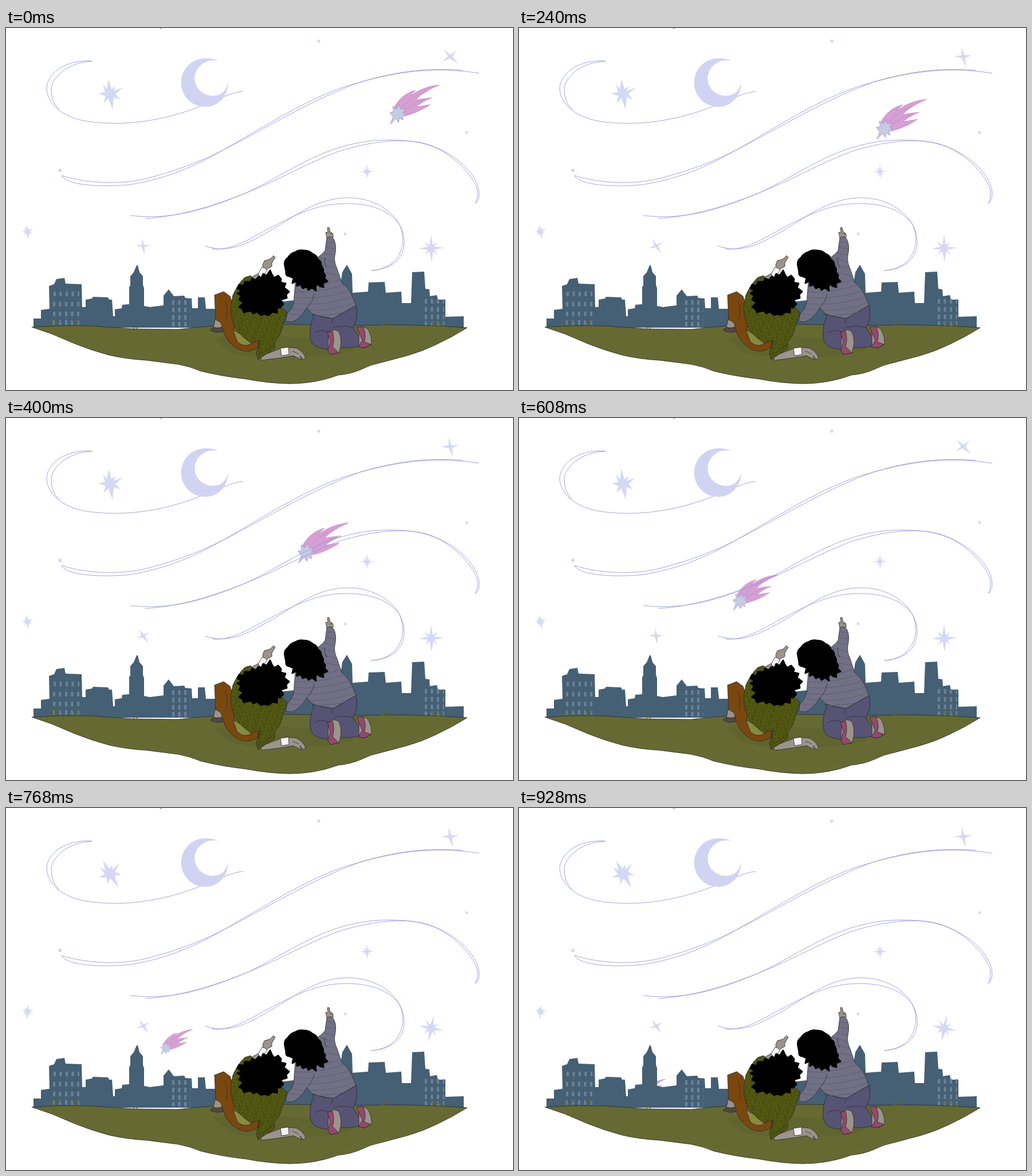
An HTML page without scripts that plays this animation: 885x633 px, repeating every 0.96 s.

```html
<!DOCTYPE html>
<html lang="en">
<head>
<meta charset="utf-8">
<title>Stargazers</title>
<style>
  html, body { margin: 0; width: 100%; height: 100%; overflow: hidden; background: #fff; }
  svg { display: block; width: 100%; height: 100%; }

  .sky { fill: #d5d7f5; }
  .wind { fill: none; stroke: #989be0; stroke-width: .9; }
  .city { fill: #455f75; }
  .windows { fill: none; stroke: #6a8295; stroke-width: 8; stroke-dasharray: 4 6.5; }
  .ink { stroke: #29282a; stroke-width: .8; stroke-linejoin: round; }
  .line { fill: none; stroke: #29282a; stroke-width: .7; }
  .grass { fill: none; stroke: #5c6129; stroke-width: 1.4; }
  .skin { fill: #9c938a; }
  .cuff { fill: #f4f3f6; }
  .hair { fill: #000; stroke: #000; stroke-width: 3; stroke-linejoin: round; }
  .ribs { fill: none; stroke: #5f5d7c; stroke-width: 1.1; }

  .comet, .swing, .sway { animation: 960ms step-end infinite; }
  .comet { animation-name: fall; }
  .swing { animation-name: swing; }
  .sway { animation-name: sway; }

  @keyframes fall {
    0% { transform: translate(684px, 149px); }
    16.667% { transform: translate(673px, 157px); }
    25% { transform: translate(638px, 175px) scale(1.02); }
    33.333% { transform: translate(586px, 202px) scale(1.04); }
    41.667% { transform: translate(524px, 234px) scale(1.03); }
    50% { transform: translate(453px, 272px); }
    58.333% { transform: translate(386px, 319px) scale(.91); }
    66.667% { transform: translate(331px, 366px) scale(.79); }
    75% { transform: translate(279px, 419px) scale(.65); }
    83.333% { transform: translate(247px, 461px) scale(.57); }
    91.667% { transform: translate(221px, 498px) scale(.49); }
  }
  @keyframes swing {
    0%, 50% { transform: rotate(var(--from)); }
    25%, 75% { transform: rotate(var(--to)); }
  }
  @keyframes sway {
    0% { transform: none; }
    75% { transform: rotate(var(--to)); }
  }
</style>
</head>
<body>
<svg viewBox="0 0 885 633" preserveAspectRatio="none">
  <defs>
    <path id="cross" d="M-1-14 2-2 13-1 3 2 3 15-2 2-13-1-2-2Z"/>
    <path id="burst" d="M-2-26 3-8 10-13 7-5 23-11 10 0 18 10 7 6 5 28-2 8-11 16-7 4-20-1-8-3-12-17-5-8Z"/>
    <path id="thin-burst" d="M0-26 3-6 12-12 6-3 25-1 6 3 13 13 4 6 1 26-3 6-12 13-6 3-24 1-6-3-14-13-3-6Z"/>
    <pattern id="spots" width="15" height="13" patternUnits="userSpaceOnUse" patternTransform="rotate(18)">
      <rect width="15" height="13" fill="#535912"/>
      <path d="M2 4q0-3 3-2M7 3q2 2 0 4M9 10q1-3 4-2M13 11q-2 2-4 1M2 9l2 2M12 3l1 2" fill="none" stroke="#3d420a" stroke-width="1.3" stroke-linecap="round"/>
    </pattern>
    <path id="sweater" d="M540 404Q552 396 557 389L560 367Q567 362 572 369Q578 380 574 398Q572 408 578 421L586 445Q598 454 604 468L611 485Q590 497 571 508Q550 505 535 500L525 489Q514 509 499 514L488 513L491 499Q504 488 503 468L505 446Q520 433 535 425Z"/>
    <clipPath id="knit"><use href="#sweater"/></clipPath>
  </defs>

  <rect width="885" height="633" fill="#fff"/>
  <path d="M268 0h5l-3 2Z" fill="#aaa"/>

  <g class="comet">
    <path d="M-6-11C2-25 14-36 31-40Q25-35 20-29C36-41 54-48 72-49C54-42 40-33 31-23Q46-26 59-27C48-23 39-17 32-11Q45-13 56-15C43-6 26 2 10 5Z" fill="#d5a0d3" stroke="#c982c5" stroke-width=".8"/>
    <path d="M8-11Q24-30 52-39M12-5Q26-18 48-23" fill="none" stroke="#c988c7" stroke-width=".9"/>
    <path d="M-13 19-8 6-14-1-7-3-9-12-2-7 2-15 5-7 13-9 9-1 15 4 8 5 9 12 3 8 1 16-3 9Z" fill="#c4cce4" stroke="#b18acb" stroke-width=".9"/>
  </g>

  <g class="wind">
    <path d="M151 58C101 54 71 82 71 106C72 132 98 156 140 163C200 172 262 164 320 144C360 130 392 112 414 111"/>
    <path d="M151 58C105 60 79 88 79 108Q79 129 92 142"/>
    <path d="M97 258C142 272 200 275 250 262Q322 243 378 214C460 167 536 117 610 97C684 76 746 67 826 79"/>
    <path d="M97 258C105 275 165 279 215 274C284 263 330 241 378 214C456 174 536 124 620 94Q712 66 798 74"/>
    <path d="M217 328C294 336 350 317 420 288C480 264 524 237 580 216C646 195 700 193 735 203C792 222 827 262 826 292Q825 303 819 307"/>
    <path d="M243 333C300 330 360 312 420 288C496 252 548 207 640 197Q718 191 760 214C800 238 820 269 823 285Q824 298 819 307"/>
    <path d="M347 381C378 393 410 383 440 366C490 341 532 300 590 297C650 294 695 332 695 374C695 406 670 422 638 424"/>
    <path d="M360 383L362 387C400 388 430 365 470 345C520 319 550 308 590 307C638 306 669 320 686 342C703 377 687 421 638 424"/>
  </g>

  <g class="sky">
    <path d="M371 57Q360 53 348 53A42.5 42.5 0 0 0 348 138A40 43 0 0 0 388 95Q384 112 371 117C347 124 325 105 330 81C336 62 352 54 371 57Z" fill="#d1d3f2"/>
    <g transform="translate(775 50) scale(1.22)"><use class="swing" href="#cross" style="--from:-37deg;--to:-4deg"/></g>
    <g transform="translate(239 381)"><use class="swing" href="#cross" style="--from:0deg;--to:-25deg"/></g>
    <g transform="translate(181 115)"><use class="sway" href="#burst" style="--to:-22deg"/></g>
    <g transform="translate(742 385) scale(.92)"><use class="sway" href="#thin-burst" style="--to:13deg"/></g>
    <g transform="translate(37 356) scale(.48)"><use class="sway" href="#burst" style="--to:14deg"/></g>
    <use href="#thin-burst" transform="translate(630 251) scale(.52)"/>
    <circle cx="546" cy="23" r="2.7"/>
    <circle cx="804" cy="183" r="2.4"/>
    <circle cx="94" cy="249" r="3"/>
    <circle cx="592" cy="360" r="2.5"/>
  </g>

  <g class="city">
    <path d="M48 524V508H49V508L61 508V493L76 491 75 451 84 448 88 439 102 437 104 447 132 448 133 488H139V475L150 473 152 470 178 471 180 475 185 475 187 504H190V492L202 490 203 484 215 483V453L217 450V434L223 427 228 415H230L233 427 239 434V449L241 455V486L251 488 275 485V468L284 457 293 469 311 468 313 472 324 473 325 490H335V471H347L349 491H370V524Z"/>
    <path d="M476 524V479L512 475 585 470V440L587 427 595 414 604 430 605 463 632 461 633 445 661 444 663 463 690 461 691 481H707L709 427 730 426 732 456 739 457 740 469 752 467 754 475H767V505L799 504V524Z"/>
  </g>
  <g class="windows">
    <path d="M83 465h45M82 483h47M82 500h47M82 515h47M290 480h32M290 493h32M290 506h32M290 518h32M731 478h34M731 492h34M731 505h34M731 517h34"/>
  </g>

  <path class="ink" fill="#666a32" d="M45 523Q98 519 150 521L222 526 300 527Q334 523 362 521L480 518 620 520Q710 517 805 524Q780 540 752 553Q728 565 700 573L655 585Q638 588 620 597Q602 605 580 607Q540 622 495 622Q455 621 420 614Q376 609 340 600Q322 592 300 588L245 581Q210 579 180 572Q150 564 120 552L80 535Z"/>
  <path d="M362 541Q440 532 600 550Q630 568 540 574Q440 579 407 571Q380 565 362 541Z" fill="#60652f"/>
  <path class="grass" d="M74 521Q80 519 76 511M85 521Q87 511 83 505M88 521Q91 512 98 513M119 521Q120 514 116 511M122 521Q127 514 126 509M224 526L222 522M228 526L230 521M654 520Q660 518 662 513M658 520Q664 516 672 515M744 521Q746 516 742 514M750 521Q753 514 760 513M755 522L764 518"/>

  <!-- Reclining figure -->
  <g class="ink">
    <path d="M364 514L376 521 381 530Q368 535 357 529Q357 525 363 524Z" fill="#514743"/>
    <path d="M366 506L378 511 379 522Q370 526 362 523Z" class="skin"/>
    <path d="M364 467L380 461 391 469 398 490 398 526Q404 541 441 545L440 558Q424 570 406 562Q386 551 380 532L375 515 366 510Z" fill="#7a470f"/>
    <path d="M396 528L419 540 429 551Q417 560 404 549Z" fill="#878b3d"/>
    <path d="M426 437L441 429 449 418 448 414 451 407 461 404 467 398 470 401 464 411 464 417 456 421 447 437 436 448Z" class="skin"/>
    <path d="M440 430L447 418Q452 419 456 423L446 438Z" class="cuff"/>
    <path d="M444 574L478 561Q491 557 508 560Q520 567 523 577L519 580 513 573 516 580 507 576 502 573Q481 577 446 581Z" class="skin"/>
    <path d="M479 560L493 558 494 571 481 573Z" class="cuff"/>
    <path d="M396 467Q405 447 417 436L427 433 434 442 460 470 491 497 478 536 469 549 469 560 440 580 437 569 443 546 428 551Q405 536 398 519Q390 499 393 483Z" fill="url(#spots)"/>
  </g>
  <path class="line" d="M443 546L442 560M440 571Q456 565 469 552M382 477Q389 493 384 511M500 565L511 570"/>
  <path class="hair" d="M427 444L430 438 436 441 441 435 446 437 449 430 455 433 461 424 464 431 468 437 475 433 480 439 479 445 488 447 485 454 494 461 489 466 490 472 479 475 484 483 478 489 473 488 473 498 465 496 458 502 450 500 446 502 438 496 432 499 427 494 415 497 413 491 407 488 415 480 407 475 411 468 404 464 412 460 404 455 407 449 415 451 417 444Z"/>

  <!-- Kneeling figure -->
  <g class="ink">
    <path d="M535 500Q551 506 571 508L611 485Q616 504 606 524L624 553Q610 560 586 559Q555 566 538 555Q528 545 531 529Q532 513 537 507Z" fill="#575374"/>
    <path d="M563 532Q575 523 582 533Q588 550 581 568L566 571 562 562Z" class="skin"/>
    <path d="M561 532L570 530Q574 545 570 557L581 568 567 571 562 565 566 548Z" fill="#94486d"/>
    <path d="M616 525Q628 520 633 529Q639 541 638 553L626 560 616 557Z" class="skin"/>
    <path d="M612 523L623 522Q630 536 625 549L637 553 627 559 615 558 622 546Z" fill="#94486d"/>
    <path d="M560 367L558 357 562 358 561 349 564 349 566 357Q572 357 571 366Z" class="skin"/>
    <use href="#sweater" fill="#727084"/>
  </g>
  <g clip-path="url(#knit)" class="ribs">
    <path d="M558 373l20 4M557 383l22 4M552 392l26 7M545 401l32 9M490 459q45 10 115-15M490 469q55 10 120-13M490 479q55 12 125-12M488 489q65 13 125-10M488 499q65 10 125-7M504 449q40 9 86-13M540 412l40 9M540 424l42 9"/>
  </g>
  <path class="line" d="M525 489Q535 480 538 465M560 419Q554 409 557 401M571 508L568 517M538 533Q552 525 563 532M606 524Q588 519 571 524M565 360h5"/>
  <path class="hair" d="M487 416Q485 407 492 402Q497 394 505 392Q511 388 519 389Q529 389 535 395Q543 398 544 405Q551 408 550 416Q555 420 553 427L557 432 556 438 561 443 553 446 554 453 547 451 545 446 540 452 541 459 534 454 528 458 525 452 518 455 514 448 508 451 508 442 500 446 502 437 495 434Q488 434 489 426Z"/>
</svg>
</body>
</html>
```
